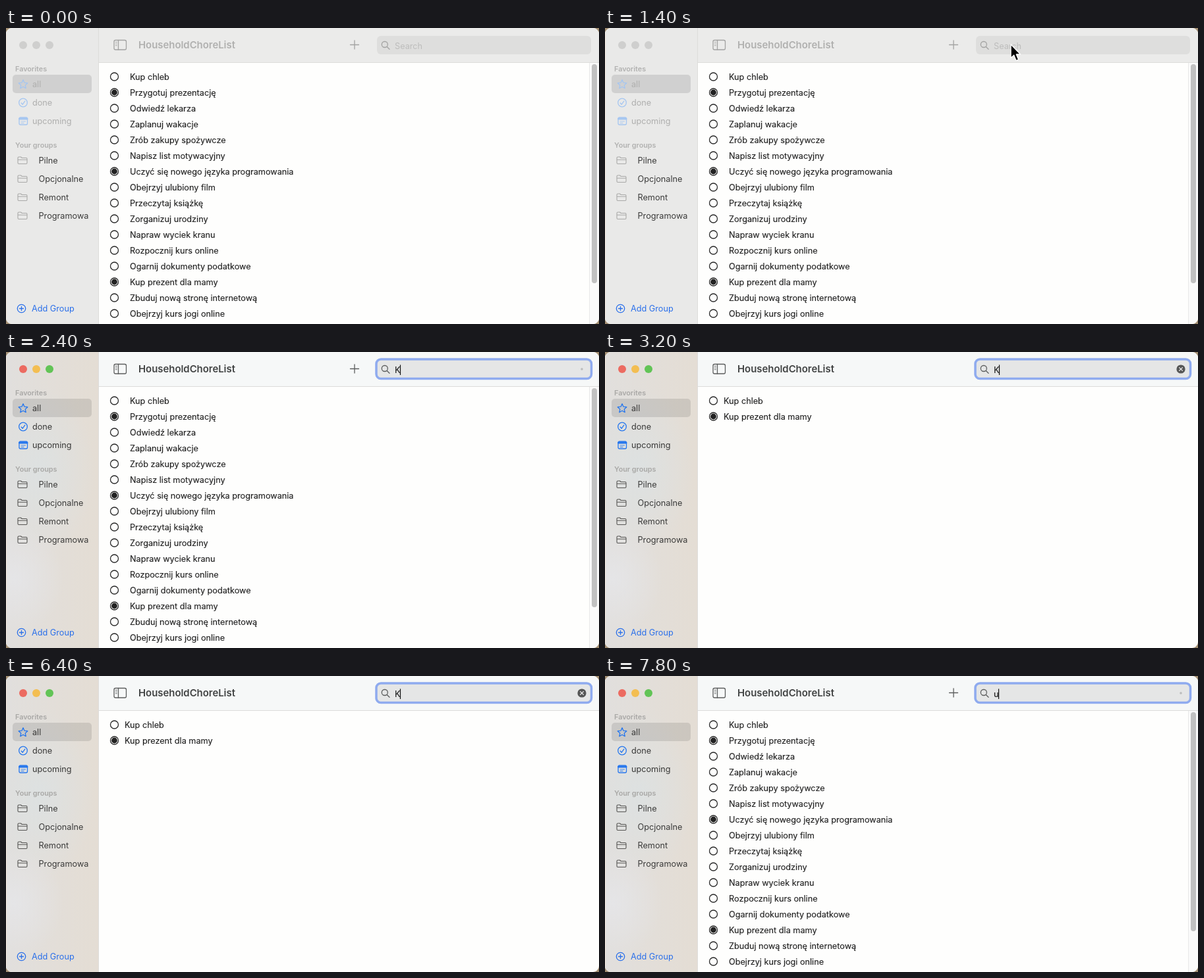
Recreate the animation shown at these times as an HTML page. Size 900 by 450 pixels, loop 8 s.

```html
<!DOCTYPE html>
<html lang="pl">
<head>
<meta charset="utf-8">
<title>Task list search</title>
<style>
  html, body { margin: 0; width: 100%; height: 100%; overflow: hidden; background: #a08c70; }
  svg {
    display: block; width: 900px; height: 450px; font: 12.68px Inter, sans-serif;
    --bar: #f6f8f8; --field: #e5e6e6; --title: #414343; --icon: #5c5e5e;
    --label: #3a3a39; --blue: #2476ee; --folder: #555452; --head: #a9a8a6;
  }
  svg.idle {
    --bar: #ebebea; --field: #dededd; --title: #b0b0af; --icon: #a3a3a2;
    --label: #afafae; --blue: #a5c6f1; --folder: #a9a9a8; --head: #b1b1b0;
  }
  .idle .tint, .idle #ring { display: none; }
  .head { font-size: 10.8px; font-weight: 600; fill: var(--head); }
  .title { font-size: 14.9px; font-weight: 600; fill: var(--title); }
  .label { fill: var(--label); }
  .ink { fill: #222; stroke: #222; stroke-width: .15; }
  .icon { fill: none; stroke: var(--icon); stroke-width: 1.3; stroke-linecap: round; stroke-linejoin: round; }
  .blue { stroke: var(--blue); }
  .folder { stroke: var(--folder); stroke-width: 1.1; }
  .light { fill: var(--on); }
  .idle .light { fill: #cfcfce; }
</style>
</head>
<body>
<svg id="stage" viewBox="0 0 900 450">
  <defs>
    <clipPath id="window"><rect width="900" height="450" rx="9"/></clipPath>
    <linearGradient id="warm">
      <stop stop-color="#e1dfdd"/><stop offset="1" stop-color="#e4ddd4"/>
    </linearGradient>
    <radialGradient id="glow">
      <stop stop-color="#dde1e1"/><stop offset="1" stop-color="#dde1e1" stop-opacity="0"/>
    </radialGradient>
    <radialGradient id="pale">
      <stop stop-color="#e5e5e7"/><stop offset="1" stop-color="#e5e5e7" stop-opacity="0"/>
    </radialGradient>
  </defs>
  <g clip-path="url(#window)">
    <rect width="900" height="450" fill="#fefefd"/>
    <rect width="141" height="450" fill="#e9e9e8"/>
    <g class="tint">
      <rect width="141" height="450" fill="url(#warm)"/>
      <ellipse cx="50" cy="180" rx="85" ry="130" fill="url(#glow)"/>
      <ellipse cx="12" cy="345" rx="75" ry="85" fill="url(#pale)"/>
    </g>
    <path d="M.5 9V441" stroke="#f1e4da"/>
    <rect x="141" width="759" height="52" fill="var(--bar)"/>
    <path d="M141 52.5H900M140.5 0V450" stroke="#dcdcda"/>

    <g id="lights"></g>
    <text class="head" x="14" y="66">Favorites</text>
    <text class="head" x="14" y="182">Your groups</text>
    <rect x="10" y="71" width="120" height="28" rx="5" fill-opacity=".105"/>
    <path class="icon blue" d="M26 78.7l2 4.5 4.8.5-3.6 3.2 1 4.8-4.2-2.5-4.2 2.5 1-4.8-3.6-3.2 4.8-.5z"/>
    <g class="icon blue">
      <circle cx="26" cy="113.5" r="6.3"/><path d="M23.2 114l2 2.2 3.6-5"/>
      <rect x="20" y="136" width="12.5" height="11" rx="2"/>
      <path d="M20.5 138H32" stroke-width="3"/><path d="M23 142h6.5M23 144.5h4" stroke-width=".9"/>
    </g>
    <g id="sidebar"></g>
    <g class="icon" style="stroke:#2b70ea">
      <circle cx="23.5" cy="426.5" r="6.2"/><path d="M20.5 426.5h6m-3-3v6"/>
    </g>
    <text x="39" y="431" fill="#2b70ea">Add Group</text>

    <g class="icon">
      <rect x="164" y="18.5" width="18.5" height="14.5" rx="2.2"/>
      <path d="M170.5 18.5v14.5"/><path d="M166.3 21.5h2m-2 2.6h2m-2 2.6h2" stroke-width=".9"/>
    </g>
    <text class="title" x="201" y="31">HouseholdChoreList</text>

    <g id="full">
      <path class="icon" d="M522.5 25.5h13m-6.5-6.5v13"/>
      <rect x="885" y="53" width="15" height="397" fill="#fafafa"/>
      <path d="M885.5 53V450" stroke="#e8e8e8"/>
      <rect x="889" y="55" width="8" height="333" rx="4" fill="#c1c1c1"/>
    </g>
    <g id="found"></g>

    <rect x="563" y="12" width="325" height="28" rx="6" fill="var(--field)"/>
    <rect id="ring" x="562" y="11" width="326.5" height="29.5" rx="7" fill="none" stroke="#8fabef" stroke-width="3.5"/>
    <g class="icon"><circle cx="574.8" cy="25" r="4.5"/><path d="M578.2 28.5l3.8 3.8"/></g>
    <text id="hint" x="590" y="32" fill="#bdbdbc">Search</text>
    <text id="query" class="ink" x="590" y="32"></text>
    <path id="caret" d="M.5 19.5V35" stroke="#111" stroke-width="1.2"/>
    <circle id="dot" cx="874" cy="26" r="1.8" fill="#bbbcbc"/>
    <g id="clear">
      <circle cx="874" cy="26" r="6.6" fill="#555656"/>
      <path d="M871.6 23.6l4.8 4.8m0-4.8l-4.8 4.8" stroke="#ececec" stroke-width="1.3" stroke-linecap="round"/>
    </g>
    <path id="pointer" d="M0 0V20.5L4.6 16.3 8 24.5 11.5 23 8.2 15H14.5Z" fill="#000" stroke="#fff" stroke-width="1.3" stroke-linejoin="round"/>
  </g>
</svg>
<script>
const $ = id => document.getElementById(id);
const add = (id, markup) => $(id).insertAdjacentHTML('beforeend', markup);
const show = (id, on) => { $(id).style.display = on ? '' : 'none'; };

const tasks = ['Kup chleb', '*Przygotuj prezentację', 'Odwiedź lekarza', 'Zaplanuj wakacje',
  'Zrób zakupy spożywcze', 'Napisz list motywacyjny', '*Uczyć się nowego języka programowania',
  'Obejrzyj ulubiony film', 'Przeczytaj książkę', 'Zorganizuj urodziny', 'Napraw wyciek kranu',
  'Rozpocznij kurs online', 'Ogarnij dokumenty podatkowe', '*Kup prezent dla mamy',
  'Zbuduj nową stronę internetową', 'Obejrzyj kurs jogi online'];

// A leading asterisk marks a finished task.
function taskRows(list, x) {
  return list.map((task, i) => {
    const y = 74 + 24 * i, done = task[0] === '*';
    return `<circle cx="164.5" cy="${y}" r="6" fill="none" stroke="#292929" stroke-width="1.3"/>` +
      (done ? `<circle cx="164.5" cy="${y}" r="4.4" fill="#222"/>` : '') +
      `<text class="ink" x="${x}" y="${y + 5}">${task.replace('*', '')}</text>`;
  }).join('');
}
add('full', taskRows(tasks, 188));
add('found', taskRows(tasks.filter(task => /^\*?Kup/.test(task)), 180));

['#ec6b61', '#f3be52', '#62c456'].forEach((color, i) =>
  add('lights', `<circle class="light" style="--on:${color}" cx="${26 + 20 * i}" cy="26" r="6"/>`));
['all', 'done', 'upcoming'].forEach((name, i) =>
  add('sidebar', `<text class="label" x="40" y="${90 + 28 * i}">${name}</text>`));
['Pilne', 'Opcjonalne', 'Remont', 'Programowa'].forEach((name, i) => {
  const y = 201.5 + 28 * i;
  add('sidebar', `<path class="icon folder" d="M18 ${y - 4}q0-1.5 1.5-1.5h3l1.7 1.5h6.3q1.5 0 1.5 1.5v6q0 1.5-1.5 1.5h-11q-1.5 0-1.5-1.5zm0 2.8h14"/>
    <text x="49.5" y="${y + 4.5}" fill="#3c3c3b">${name}</text>`);
});

const typing = [[0, ''], [2400, 'K'], [3400, 'Ku'], [3600, 'Kup'], [5400, 'Ku'], [6400, 'K'], [7000, ''], [7800, 'u']];
const moves = [[0, null], [600, [673, 111]], [800, [613, 73]], [1000, [616, 34]], [1200, [616, 28]],
  [1400, [616, 25]], [1600, null]];
const valueAt = (steps, t) => steps.findLast(step => step[0] <= t)[1];
const within = (t, from, to) => t >= from && t < to;

function render(t) {
  const active = t >= 1600, filtered = within(t, 3200, 7000);
  const text = valueAt(typing, t), spot = valueAt(moves, t);
  $('stage').classList.toggle('idle', !active);
  show('full', !filtered);
  show('found', filtered);
  show('clear', filtered);
  show('dot', text && !filtered);
  show('hint', !text);
  $('query').textContent = text;
  show('caret', active && !within(t, 3800, 4400) && !within(t, 6000, 6400));
  const end = 590 + (text ? $('query').getComputedTextLength() : 0);
  $('caret').setAttribute('transform', `translate(${Math.round(end - .5)})`);
  show('pointer', spot);
  if (spot) $('pointer').setAttribute('transform', `translate(${spot})`);
}

const start = performance.now();
(function tick() {
  render((performance.now() - start) % 8000);
  requestAnimationFrame(tick);
})();
</script>
</body>
</html>
```
